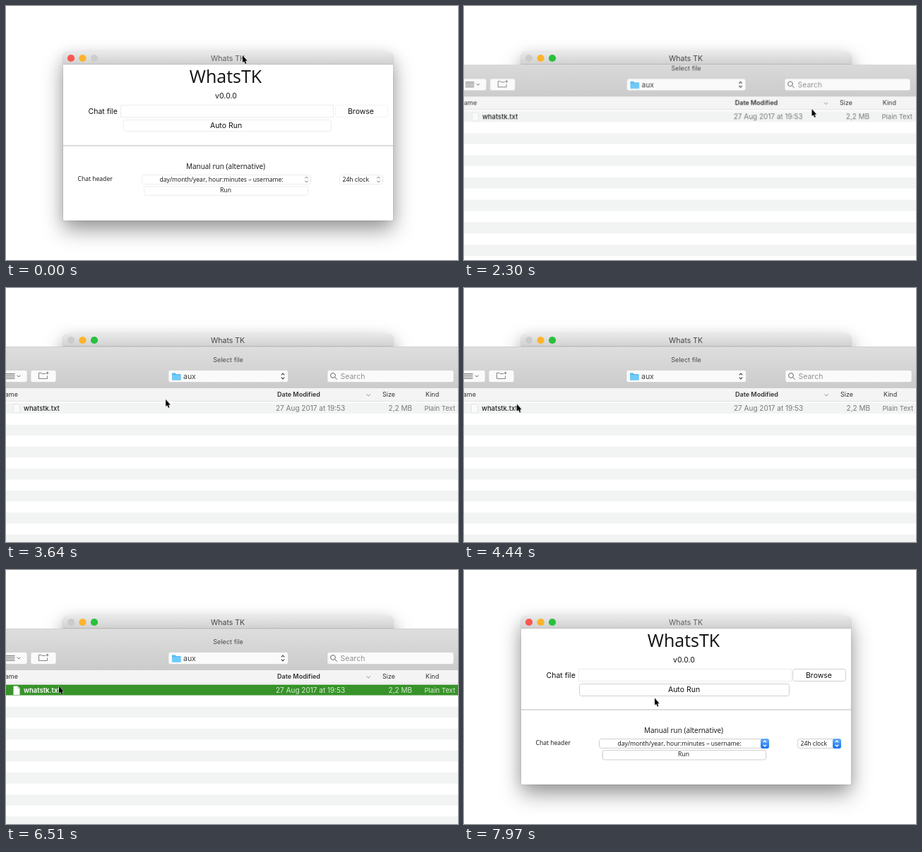
An HTML page for the animation above (8 s loop, 640 by 360 pixels).

```html
<!DOCTYPE html>
<html lang="en">
<head>
<meta charset="utf-8">
<title>File chooser</title>
<style>
html, body { margin: 0; width: 100%; height: 100%; overflow: hidden; background: #fff; }
#stage { position: relative; width: 640px; height: 360px; overflow: hidden; background: #fff; }
svg { position: absolute; left: 0; top: 0; display: block; }

.shadow {
  position: absolute; left: 81px; top: 66px; width: 467px; height: 238px;
  border-radius: 5px 5px 3px 3px;
  box-shadow: 0 13px 30px rgba(0, 0, 0, .4), 0 2px 18px rgba(0, 0, 0, .08), 0 0 2px rgba(0, 0, 0, .2);
}

text { font-family: Inter, Roboto, sans-serif; font-size: 10.5px; fill: #111; }
.mid { text-anchor: middle; }
.end { text-anchor: end; }
.tk { font-family: "Open Sans", "Noto Sans", sans-serif; font-size: 8.6px; }
.big { font-size: 25px; }
.sub { font-size: 10px; }
.title { fill: #606060; }
.title.modal { fill: #444; }
.small { font-size: 9.1px; fill: #4c4c4c; }
.head { font-size: 9px; fill: #333; }
.bold { font-weight: 600; }
.cell { font-size: 10px; fill: #777; }
.file { font-size: 9.5px; font-weight: 500; fill: #222; }
.kind { font-size: 9.5px; }
.selected .cell { fill: #d9ecd5; }
.selected .file { font-weight: 600; fill: #fff; }
.line { fill: none; stroke: #666; }
.faint { fill: #fff; stroke: #ececec; }
.button { fill: #fff; stroke: #cfcfcf; }
.control { fill: #fafafa; stroke: #cbcbcb; stroke-width: .6; }

/* timeline */
.cursor, .sheet, .modal, .normal, .selected, .active { animation: 8s linear infinite; }
.modal, .normal, .selected, .active { animation-timing-function: step-end; }
.cursor { animation-name: point; }
.sheet { animation-name: unfold; }
.modal { animation-name: modal; }
.normal { animation-name: normal; }
.selected { animation-name: selected; }
.active { animation-name: active; }

@keyframes point {
  0%, 3% { transform: translate(335px, 70px); animation-timing-function: ease-in-out; }
  18.5%, 36.5% { transform: translate(492.5px, 146px); animation-timing-function: ease-in-out; }
  52%, 89% { transform: translate(75px, 164.5px); animation-timing-function: ease-in-out; }
  99%, 100% { transform: translate(270px, 181.5px); }
}
@keyframes unfold {
  0%, 25% {
    transform: perspective(320px) scale(.76) rotateX(37deg) translateY(-390px);
    visibility: hidden;
  }
  25.01% {
    transform: perspective(320px) scale(.76) rotateX(37deg) translateY(-390px);
    visibility: visible; animation-timing-function: ease-out;
  }
  29.4%, 83.75% {
    transform: perspective(320px) scale(1) rotateX(0deg) translateY(0);
    visibility: visible;
  }
  87.1%, 87.98% {
    transform: perspective(320px) scale(.785) rotateX(33deg) translateY(-345px);
    visibility: visible;
  }
  88%, 100% {
    transform: perspective(320px) scale(.76) rotateX(37deg) translateY(-390px);
    visibility: hidden;
  }
}
@keyframes modal { 0%, 88%, 100% { opacity: 0; } 25% { opacity: 1; } }
@keyframes normal { 0%, 88%, 100% { opacity: 1; } 25% { opacity: 0; } }
@keyframes selected { 0% { opacity: 0; } 68%, 100% { opacity: 1; } }
@keyframes active { 0% { opacity: 0; } 88.9%, 100% { opacity: 1; } }

.slot { position: absolute; left: 0; top: 83px; width: 640px; height: 277px; overflow: hidden; }
.sheet {
  position: absolute; left: -30px; top: 0; width: 688px; height: 390px;
  transform-origin: 50% 0; box-shadow: 0 3px 9px rgba(0, 0, 0, .28);
}
</style>
</head>
<body>
<div id="stage">
  <div class="shadow"></div>

  <svg width="640" height="360" viewBox="0 0 640 360">
    <defs>
      <linearGradient id="bar" x2="0" y2="1">
        <stop stop-color="#e9e9e9"/><stop offset="1" stop-color="#d0d0d0"/>
      </linearGradient>
      <linearGradient id="blue" x2="0" y2="1">
        <stop stop-color="#66aef8"/><stop offset="1" stop-color="#1870ef"/>
      </linearGradient>
      <path id="arrows" d="M-2.2 -1.7L0 -4 2.2 -1.7M-2.2 1.7L0 4 2.2 1.7" fill="none"/>
    </defs>

    <path d="M81 304V70q0-5 5-5H543q5 0 5 5V301q0 3-3 3H84q-3 0-3-3Z" fill="#fff"/>
    <path d="M81 83V70q0-5 5-5H543q5 0 5 5V83Z" fill="url(#bar)"/>
    <path d="M81 82.5H548" stroke="#bdbdbd"/>
    <path d="M81 198H548" stroke="#d0d0d0" stroke-width="1.6"/>

    <circle cx="92" cy="74" r="5.1" fill="#cbcbcb"/>
    <circle class="normal" cx="92" cy="74" r="5.1" fill="#fc5650"/>
    <circle cx="108.5" cy="74" r="5.1" fill="#fdb32a"/>
    <circle cx="125" cy="74" r="5.1" fill="#cdcdcd"/>
    <circle class="modal" cx="125" cy="74" r="5.1" fill="#27c13c"/>
    <circle class="active" cx="125" cy="74" r="5.1" fill="#27c13c"/>
    <text class="title mid normal" x="314" y="77.8">Whats TK</text>
    <text class="title mid modal" x="314" y="77.8">Whats TK</text>

    <g class="faint">
      <rect x="162.5" y="140.5" width="301" height="17"/>
      <rect x="466.5" y="140.5" width="74" height="17" rx="3" stroke="#f3f3f3"/>
      <rect x="166.5" y="161.5" width="294" height="16" rx="3"/>
      <rect x="192.5" y="239.5" width="239" height="13" rx="3"/>
      <rect x="472.5" y="239.5" width="61" height="13" rx="3"/>
      <rect x="195.5" y="255.5" width="232" height="13" rx="3"/>
    </g>
    <g stroke="#777">
      <use href="#arrows" x="425.5" y="246"/>
      <use href="#arrows" x="527.5" y="246"/>
    </g>

    <g class="active">
      <g class="button">
        <rect x="465.5" y="140.5" width="75" height="17" rx="3"/>
        <rect x="163.5" y="161.5" width="297" height="17" rx="3"/>
        <rect x="191.5" y="239.5" width="240" height="13" rx="3"/>
        <rect x="472.5" y="239.5" width="61" height="13" rx="3"/>
        <rect x="196.5" y="255.5" width="231" height="13.5" rx="3"/>
      </g>
      <rect x="420" y="239" width="12" height="14" rx="3" fill="url(#blue)"/>
      <rect x="522" y="239" width="12" height="14" rx="3" fill="url(#blue)"/>
      <g stroke="#fff" stroke-width="1.3">
        <use href="#arrows" x="426" y="246"/>
        <use href="#arrows" x="528" y="246"/>
      </g>
    </g>

    <text class="tk big mid" x="311" y="109">WhatsTK</text>
    <text class="mid" x="311.5" y="131">v0.0.0</text>
    <text x="116.5" y="152.5">Chat file</text>
    <text class="mid" x="502.5" y="152.5">Browse</text>
    <text class="mid" x="311.5" y="173">Auto Run</text>
    <text class="tk sub mid" x="311" y="230.5">Manual run (alternative)</text>
    <text class="tk" x="101.5" y="248">Chat header</text>
    <text class="tk" x="217.5" y="249">day/month/year, hour:minutes – username:</text>
    <text class="tk" x="476.5" y="249">24h clock</text>
    <text class="tk mid" x="311" y="264">Run</text>
  </svg>

  <div class="slot">
    <div class="sheet">
      <svg width="688" height="390" viewBox="-30 83 688 390">
        <defs>
          <linearGradient id="tools" x2="0" y2="1">
            <stop stop-color="#dedede"/><stop offset="1" stop-color="#cbcbcb"/>
          </linearGradient>
          <linearGradient id="foot" x2="0" y2="1">
            <stop stop-color="#e4e4e4"/><stop offset="1" stop-color="#d2d2d2"/>
          </linearGradient>
          <pattern id="rows" y="162.5" width="688" height="31.15" patternUnits="userSpaceOnUse">
            <rect width="688" height="15.6" fill="#f2f4f4"/>
          </pattern>
        </defs>

        <rect x="-30" y="83" width="688" height="390" fill="#fff"/>
        <rect x="-30" y="83" width="688" height="59" fill="url(#tools)"/>
        <path d="M-30 83.3H658" stroke="#c4c4c4" stroke-width=".7"/>
        <text class="small mid" x="314.5" y="104.8">Select file</text>

        <g class="control">
          <rect x="-12" y="116.5" width="42" height="17" rx="3"/>
          <rect x="35" y="116.5" width="36" height="17" rx="3"/>
          <rect x="230" y="116.5" width="169.5" height="17" rx="3"/>
          <rect x="455" y="116.5" width="179" height="17" rx="3"/>
        </g>
        <path class="line" d="M0 121.5H12.5M0 123.7H12.5M0 126H12.5M0 128.3H12.5" stroke-width=".9"/>
        <path class="line" d="M15.8 123.7l2.3 2.3 2.3-2.3"/>
        <path class="line" d="M56 121.5H51l-1-1.2H46.5V128.5H58.5V124.5M58.5 118.5V122.5M56.5 120.5H60.5" stroke-width=".8"/>
        <path d="M235 120.5h4.5l1.5 1.5h6.5v8.5H235Z" fill="#56b9f0"/>
        <path d="M235 123.3h12.5v7.2H235Z" fill="#70caf8"/>
        <text x="251" y="128.6" fill-opacity=".8">aux</text>
        <use href="#arrows" x="392" y="125" stroke="#444" stroke-width="1.2"/>
        <circle class="line" cx="463" cy="124" r="3.4"/>
        <path class="line" d="M465.5 126.5l3.3 3.3"/>
        <text x="473.5" y="128.6" fill-opacity=".45">Search</text>

        <rect x="-30" y="142" width="688" height="19" fill="#f4f4f4"/>
        <path d="M-30 160.5H658" stroke="#e2e2e2"/>
        <text class="head" x="-8" y="154.2">Name</text>
        <text class="head bold" x="384" y="154.2">Date Modified</text>
        <path class="line" d="M510.5 150.5l2.7 2.5 2.7-2.5" stroke-opacity=".7"/>
        <text class="head" x="533" y="154.2">Size</text>
        <text class="head" x="594" y="154.2">Kind</text>

        <rect x="-30" y="162.5" width="688" height="269.5" fill="url(#rows)"/>
        <path d="M10.5 164.5h6l3 3v9.5h-9Z" fill="#fafafa" stroke="#ddd" stroke-width=".7"/>
        <text class="file" x="25" y="173.7">whatstk.txt</text>
        <text class="cell" x="382" y="173.7">27 Aug 2017 at 19:53</text>
        <text class="cell end" x="575" y="173.7">2,2 MB</text>
        <text class="cell kind" x="592.5" y="173.7">Plain Text</text>

        <g class="selected">
          <rect x="-30" y="162.5" width="688" height="15" fill="#38932a"/>
          <path d="M10.5 164.5h6l3 3v9.5h-9Z" fill="#fff"/>
          <path d="M16.5 164.5v3h3" fill="none" stroke="#aaa" stroke-width=".7"/>
          <text class="file" x="25" y="173.7">whatstk.txt</text>
          <text class="cell" x="382" y="173.7">27 Aug 2017 at 19:53</text>
          <text class="cell end" x="575" y="173.7">2,2 MB</text>
          <text class="cell kind" x="592.5" y="173.7">Plain Text</text>
        </g>

        <rect x="-30" y="432" width="688" height="41" fill="url(#foot)"/>
        <path d="M-30 432H658" stroke="#bdbdbd"/>
        <g class="control">
          <rect x="-14" y="443" width="76" height="17" rx="3"/>
          <rect x="504" y="443" width="66" height="17" rx="3"/>
          <rect x="575" y="443" width="70" height="17" rx="3"/>
        </g>
        <text class="mid" x="24" y="455.5">Options</text>
        <text class="mid" x="537" y="455.5">Cancel</text>
        <text class="mid" x="610" y="455.5">Open</text>
      </svg>
    </div>
  </div>

  <svg width="640" height="360" viewBox="0 0 640 360">
    <path class="cursor" d="M0 0V10L2.2 8.2 3.8 12 5.4 11.3 3.9 7.7H6.7Z"
      fill="#000" stroke="#fff" stroke-width=".9" paint-order="stroke"/>
  </svg>
</div>
</body>
</html>
```
